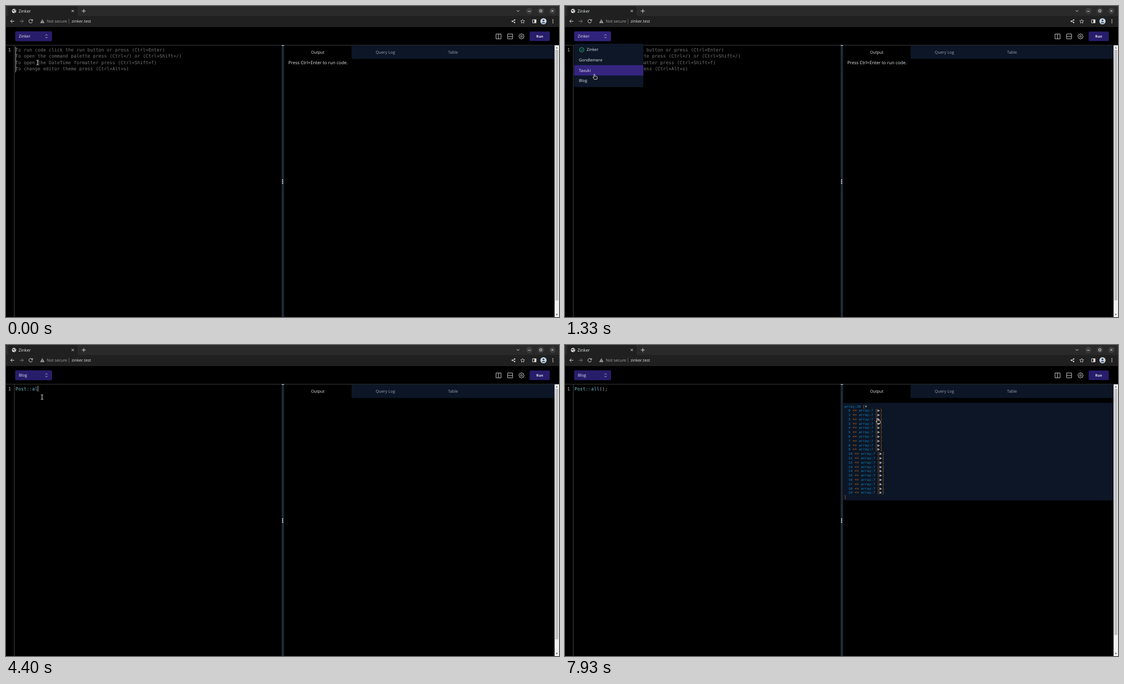
An HTML page that plays this animation: 997 px wide and 561 px high, repeating every 8000 ms.

```html
<!DOCTYPE html>
<html lang="en">
<head>
<meta charset="utf-8">
<title>Code runner</title>
<style>
  html, body { margin: 0; width: 100%; height: 100%; overflow: hidden; background: #000; }
  svg { display: block; width: 997px; height: 561px; text-rendering: geometricPrecision; }
  text { font: 7.27px "Open Sans", "Noto Sans", sans-serif; fill: #e5e7eb; white-space: pre; }
  .mid { text-anchor: middle; }
  .code { font: 8.31px "DejaVu Sans Mono", monospace; fill: #b5b5b5; }
  .hint { fill: #747474; }
  .dump { font: 6.23px "Liberation Mono", "DejaVu Sans", monospace; fill: #e87a0c; }
  .num { fill: #1189c4; }
  .fold { fill: #a0a0a0; }
  .cls { fill: #79b8c2; }
  .fn { fill: #76bcd0; }
  .op { fill: #83969a; }
  .line { fill: none; stroke: #d5d5d5; stroke-width: 1; }
  .tab { fill: #9ca3af; }
</style>
</head>
<body>
<svg viewBox="0 0 997 561" xmlns="http://www.w3.org/2000/svg">
  <!-- browser bar -->
  <rect width="997" height="38" fill="#1f201f"/>
  <path d="M0 0H997V18H132Q129 18 129 15V3Q129 0 126 0H7Q4 0 4 3V15Q4 18 0 18Z" fill="#292a29"/>
  <circle cx="14.5" cy="9" r="3.8" fill="#e4e4e4"/>
  <path d="M12 7l2 .5 1 1.5-1.5 1-1.5-1zM15.5 6l2 1.5-.5 1-1.5-.5zM15 10l2 .5-1.5 1.5z" fill="#333"/>
  <text x="22.5" y="11.5" style="font-size:7.7px">Zinker</text>
  <path class="line" d="M118.3 6.8l4.2 4.2m0-4.2l-4.2 4.2M136.7 9h7m-3.500-3.500v7M920.800 7.700l2.400 2.400 2.400-2.400"/>
  <g fill="#3d3d3d"><circle cx="943.500" cy="8.800" r="5.700"/><circle cx="964.300" cy="8.800" r="5.700"/><circle cx="985" cy="8.800" r="5.700"/></g>
  <path class="line" stroke-width=".8" d="M941.500 9.500h4M962.500 7h3.600v3.600h-3.600zM983.300 7.100l3.400 3.400m0-3.400l-3.400 3.400"/>
  <path class="line" d="M15 27.500H8.300m3.200-3.200l-3.200 3.200 3.200 3.200"/>
  <path class="line" style="stroke:#777" d="M24.700 27.500h6.700m-3.200-3.200l3.200 3.200-3.200 3.200"/>
  <path class="line" d="M47.300 25.800a3.200 3.200 0 1 0 .3 2.500M48 23.800v2.500h-2.700"/>
  <path d="M65.500 23.800l3.900 7h-7.800z" fill="#a5a5a5"/>
  <path d="M65.500 26.200v2.200m0 .7v.8" stroke="#222" stroke-width=".8"/>
  <text x="73.500" y="30.200" style="fill:#a8a8a8">Not secure</text>
  <path d="M113.500 23v9" stroke="#666" stroke-width=".8"/>
  <text x="118.300" y="30.200">zinker.test</text>
  <path class="line" stroke-width=".8" d="M917 25.300l-4 2.200 4 2.200"/>
  <g fill="#d5d5d5"><circle cx="917" cy="25.200" r="1.200"/><circle cx="912.800" cy="27.500" r="1.200"/><circle cx="917" cy="29.800" r="1.200"/></g>
  <path class="line" style="stroke-width:.8" d="M931.500 24l1 2.500 2.700.2-2 1.700.6 2.600-2.300-1.400-2.300 1.400.6-2.600-2-1.700 2.700-.2z"/>
  <path class="line" d="M949.300 24.800h6.400v5.600h-6.400z"/><path d="M952.500 24.500h3.500v6h-3.500z" fill="#e0e0e0"/>
  <circle cx="969" cy="27.500" r="5.600" fill="#c9d6e4"/>
  <path d="M965.700 31a3.400 2.500 0 0 1 6.600 0z" fill="#34455a"/><circle cx="969" cy="26" r="1.700" fill="#34455a"/>
  <g fill="#d5d5d5"><circle cx="986" cy="24.700" r=".9"/><circle cx="986" cy="27.500" r=".9"/><circle cx="986" cy="30.300" r=".9"/></g>

  <!-- header -->
  <rect id="pick" x="16.500" y="45.800" width="66.500" height="17.700" rx="2" fill="#281d6b"/>
  <text id="site" x="23" y="57"></text>
  <path class="line" style="stroke-width:.8" d="M71.200 53.300l1.800-1.900 1.800 1.900M71.200 55.900l1.800 1.900 1.800-1.900"/>
  <path class="line" style="stroke-width:.9" d="M883.500 50.500h9v8.700h-9zm4.500 0v8.700M904.300 50.500h9v8.700h-9zm0 4.400h9"/>
  <circle class="line" cx="929.400" cy="54.800" r="1.600" style="stroke-width:.9"/>
  <path id="gear" class="line" style="stroke-width:.9"/>
  <rect x="944" y="46" width="36.500" height="17.300" rx="2" fill="#281d6b"/>
  <text class="mid" x="962.200" y="56.800" style="font-size:6.230px;font-weight:700">Run</text>
  <rect y="70.300" width="997" height="1" fill="#3c3c3c"/>

  <!-- editor -->
  <rect x="14.500" y="71" width="1" height="490" fill="#484848"/>
  <text class="code" x="4" y="81.500">1</text>
  <g id="hints"></g>
  <text id="typed" class="code" x="17" y="81.500"></text>
  <rect id="caret" y="73.500" width=".9" fill="#c4c4c4"/>

  <!-- result pane -->
  <rect x="497" y="71" width="4.300" height="490" fill="#1e2935"/>
  <rect x="497" y="70.600" width="4.300" height="1.300" fill="#b5bcc4"/>
  <g fill="#fff"><circle cx="498.600" cy="313.700" r="1"/><circle cx="498.600" cy="316.700" r="1"/><circle cx="498.600" cy="319.700" r="1"/></g>
  <rect x="623" y="71" width="366" height="24.500" fill="#0c1626"/>
  <text class="mid" x="562" y="86">Output</text>
  <text class="mid tab" x="684" y="86">Query Log</text>
  <text class="mid tab" x="806" y="86">Table</text>
  <text id="prompt" x="509" y="104.800" style="font-size:8.030px">Press Ctrl+Enter to run code.</text>
  <g id="dump"><rect x="501.300" y="104.500" width="487.700" height="175.800" fill="#0c1626"/></g>
  <rect x="989" y="71" width="8" height="490" fill="#f1f1f1"/>
  <rect id="thumb" x="990.200" y="79" width="5.600" fill="#c1c1c1"/>
  <path d="M991 76.500l2-2.500 2 2.500zM991 555.500l2 2.500 2-2.500z" fill="#606060"/>

  <!-- site list -->
  <g id="menu">
    <rect x="16.500" y="68" width="124.700" height="78.300" rx="2.500" fill="#0d1728"/>
    <rect id="hover" x="16.500" width="124.700" height="18.700" fill="#35257f"/>
    <circle cx="30.200" cy="79" r="4" fill="none" stroke="#22b573" stroke-width=".9"/>
    <path d="M28.300 79.200l1.400 1.400 2.400-3" fill="none" stroke="#22b573" stroke-width=".9"/>
  </g>

  <!-- pointers, tip at 0,0 -->
  <g id="beam" fill="none">
    <path d="M-2-4.300q2 0 2 1 0-1 2-1M0-3.300v6.600M-2 4.300q2 0 2-1 0 1 2 1" stroke="#000" stroke-width="2.200"/>
    <path d="M-2-4.300q2 0 2 1 0-1 2-1M0-3.300v6.600M-2 4.300q2 0 2-1 0 1 2 1" stroke="#eee" stroke-width="1"/>
  </g>
  <path id="arrow" d="M0 0v9l2.100-1.900 1.400 3.200 1.400-.6-1.400-3.100h2.800z" fill="#111" stroke="#eee" stroke-width=".7"/>
  <path id="hand" d="M-.9.600q.9-1 1.700 0v3.100l3.500.8q1.300.4 1 1.900l-.7 3.100h-4.800l-2.300-3.200q-.2-1.200 1-.8l.6.600z" fill="#161616" stroke="#eee" stroke-width=".8"/>
</svg>
<script>
const LOOP = 8000, CHAR = 5.003;
const $ = id => document.getElementById(id);
const show = (id, on) => { $(id).style.display = on ? "" : "none"; };

function addText(parent, x, y, cls, html) {
  const el = document.createElementNS("http://www.w3.org/2000/svg", "text");
  el.setAttribute("x", x);
  el.setAttribute("y", y);
  el.setAttribute("class", cls);
  el.innerHTML = html;
  $(parent).append(el);
}
const span = (cls, s) => `<tspan class="${cls}">${s}</tspan>`;

["To run code click the run button or press (Ctrl+Enter)",
 "To open the command palette press (Ctrl+/) or (Ctrl+Shift+/)",
 "To open the DateTime formatter press (Ctrl+Shift+f)",
 "To change editor theme press (Ctrl+Alt+s)"
].forEach((s, i) => addText("hints", 17, 81.5 + i * 11.63, "code hint", s));

["Zinker", "Gondlemere", "Tavuki", "Blog"]
  .forEach((s, i) => addText("menu", i ? 25 : 39, 81.2 + i * 18.7, "", s));

addText("dump", 503.5, 112.5, "dump", span("num", "array:20") + " [" + span("fold", "▼"));
for (let i = 0; i < 20; i++)
  addText("dump", 511, 120.3 + i * 7.79, "dump",
    `${span("num", i)} =&gt; ${span("num", "array:7")} [${span("fold", "▶")}]`);
addText("dump", 503.5, 276.1, "dump", "]");

// eight-toothed gear outline
let gear = "";
for (let i = 0; i < 32; i++) {
  const a = i * Math.PI / 16, r = i % 4 < 2 ? 4.9 : 3.8;
  gear += `${i ? "L" : "M"}${929.4 + r * Math.cos(a)} ${54.8 + r * Math.sin(a)}`;
}
$("gear").setAttribute("d", gear + "Z");

// pointer stops: time, x, y
const path = [
  [0, 57, 102], [70, 57, 102], [630, 52, 56], [900, 52, 57], [1070, 53, 107],
  [1500, 53, 131], [1730, 53, 131], [1870, 53, 122], [2270, 65, 94],
  [6600, 65, 94], [7330, 561, 131], [7400, 561, 131], [7470, 561, 129],
  [7670, 561, 129], [7930, 563.5, 132], [LOOP, 563.5, 132]
];
function pointerAt(t) {
  const i = path.findIndex(p => p[0] > t);
  const [t0, x0, y0] = path[i - 1], [t1, x1, y1] = path[i];
  const k = (t - t0) / (t1 - t0), e = k * k * (3 - 2 * k);
  return [x0 + (x1 - x0) * e, y0 + (y1 - y0) * e];
}

const source = "Post::all();";
const keys = [3000, 3200, 3400, 3670, 3930, 4070, 4270, 4400, 4600, 4870, 5000, 5400];

function colour(n) {
  const part = (a, b) => source.slice(a, Math.min(b, n));
  if (n < 5) return part(0, 4);
  return span("cls", part(0, 4)) + span("op", part(4, 6)) + span("fn", part(6, 9)) + part(9, 12);
}

function caretOn(t) {
  if (t < 630) return true;
  if (t < 2270) return false;
  if (t < 3000) return t < 2800;
  if (t < 5470) return true;
  return t < 7900 && (t - 5470) % 1100 < 530;
}

let typedCount = -1;
function draw(t) {
  const n = keys.filter(k => k <= t).length;
  if (n !== typedCount) $("typed").innerHTML = colour(typedCount = n);
  show("hints", !n);
  show("caret", caretOn(t));
  $("caret").setAttribute("x", 17 + n * CHAR);
  $("caret").setAttribute("height", n ? 10.5 : 46);

  const [x, y] = pointerAt(t);
  const inMenu = t >= 800 && t < 1800;
  const onPick = y < 64;
  $("site").textContent = t < 1730 ? "Zinker" : "Blog";
  $("pick").setAttribute("fill", onPick || inMenu ? "#30237b" : "#281d6b");
  $("menu").style.opacity = t < 1730 ? Math.min(1, Math.max(0, (t - 770) / 100)) : Math.max(0, 1 - (t - 1730) / 100);
  const row = Math.max(0, Math.min(3, Math.floor((y - 69.3) / 18.7)));
  $("hover").setAttribute("y", 69.3 + row * 18.7);

  const done = t >= 6270;
  show("prompt", t < 1800);
  show("dump", done);
  $("thumb").setAttribute("height", done ? 444 : 452);

  const kind = onPick || inMenu || t >= 7400 ? "hand" : x > 496 ? "arrow" : "beam";
  for (const id of ["beam", "arrow", "hand"]) show(id, id === kind);
  $(kind).setAttribute("transform", `translate(${x} ${y})`);
}

const start = performance.now();
function tick() {
  draw((performance.now() - start) % LOOP);
  requestAnimationFrame(tick);
}
draw(0);
requestAnimationFrame(tick);
</script>
</body>
</html>
```
